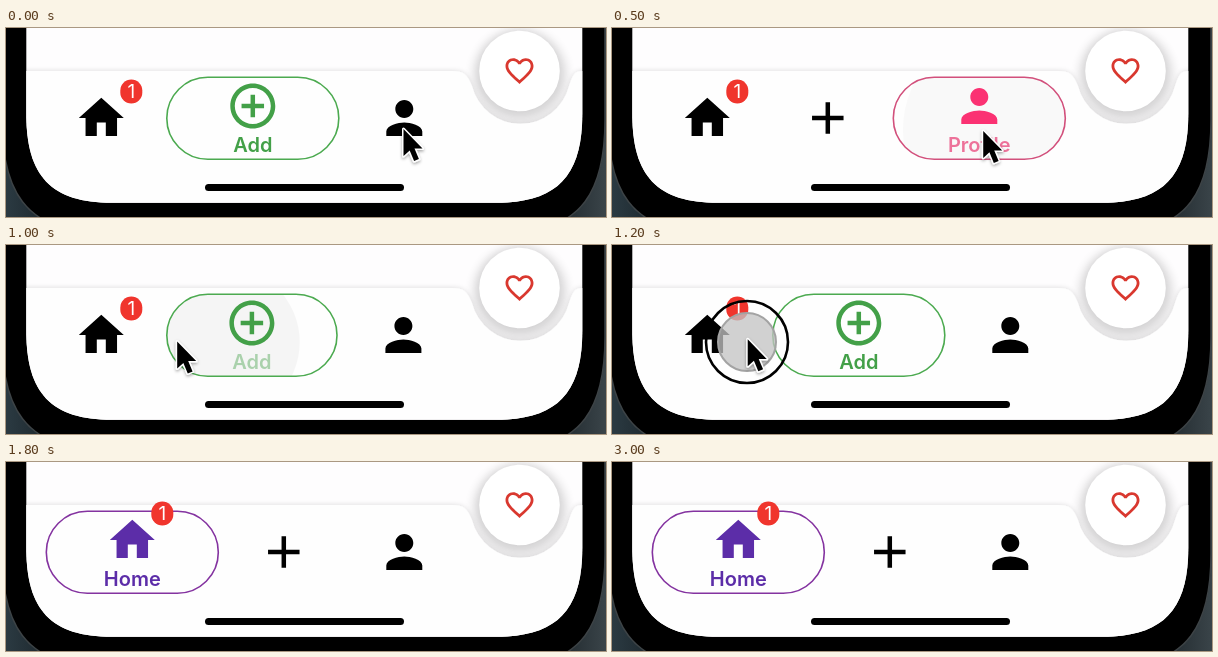
Write an HTML page that moves like this. It is 600 px wide and 189 px high and loops after 3.1 s.

```html
<!DOCTYPE html>
<html lang="en">
<head>
<meta charset="utf-8">
<title>Tab bar</title>
<style>
  html, body { margin: 0; width: 100%; height: 100%; overflow: hidden; background: #000; }
  svg { display: block; width: 600px; height: 189px; }
  text { font-family: Inter, Roboto, sans-serif; text-anchor: middle; }
  .label { font-size: 20px; font-weight: 600; }
  .pill { fill: none; stroke-width: 1.6; }
</style>
</head>
<body>
<svg viewBox="0 0 600 189">
  <defs>
    <linearGradient id="desk" x2="1">
      <stop offset="0" stop-color="#2b3a42"/>
      <stop offset=".06" stop-color="#1f2a30"/>
      <stop offset=".94" stop-color="#262f34"/>
      <stop offset="1" stop-color="#3a4449"/>
    </linearGradient>
    <clipPath id="screen">
      <path d="M20.3 -20V86C20.3 148 45 174.8 106 174.8H490C551 174.8 576.3 148 576.3 86V-20Z"/>
    </clipPath>
    <filter id="soft" x="-40%" y="-40%" width="180%" height="180%"><feGaussianBlur stdDeviation="4"/></filter>
    <filter id="edge" x="-5%" y="-20%" width="110%" height="140%">
      <feDropShadow dx="0" dy="-1" stdDeviation="2" flood-opacity=".1"/>
    </filter>
    <filter id="drop" x="-50%" y="-50%" width="200%" height="200%">
      <feDropShadow dx="0" dy="1.5" stdDeviation="1.5" flood-opacity=".35"/>
    </filter>
  </defs>

  <rect width="600" height="189" fill="url(#desk)"/>
  <path d="M-4 -20V92C-4 162 20 203 88 203H508C576 203 599 162 599 92V-20Z" stroke="#3d4346" stroke-width="1.5"/>

  <g clip-path="url(#screen)">
    <rect width="600" height="189" fill="#fefdfe"/>
    <circle cx="514" cy="48" r="48" opacity=".1" filter="url(#soft)"/>
    <path d="M0 43H446C457 43 461 46 466 58A50 50 0 0 0 563 58C567 46 569 43 577 43H600V200H0Z"
          fill="#fefefe" filter="url(#edge)"/>
    <circle cx="513.5" cy="45" r="40" opacity=".1" filter="url(#soft)"/>
    <circle cx="513.5" cy="43" r="40.3" fill="#fff"/>
    <path transform="translate(496.7 26) scale(1.4)" fill="#d9382f" d="M16.5 3c-1.74 0-3.41.81-4.5 2.09C10.91 3.81 9.24 3 7.5 3 4.42 3 2 5.42 2 8.5c0 3.78 3.4 6.86 8.55 11.54L12 21.35l1.45-1.32C18.6 15.36 22 12.28 22 8.5 22 5.42 19.58 3 16.5 3zm-4.4 15.55l-.1.1-.1-.1C7.14 14.24 4 11.39 4 8.5 4 6.5 5.5 5 7.5 5c1.54 0 3.04.99 3.57 2.36h1.87C13.46 5.99 14.96 5 16.5 5c2 0 3.5 1.5 3.5 3.5 0 2.89-3.14 5.74-7.9 10.05z"/>
    <rect x="199" y="156" width="199" height="7" rx="3.5"/>
    <g id="tabs"></g>
  </g>

  <g id="press">
    <circle r="29" fill="#c3c3c3" fill-opacity=".76" stroke="#a3a3a3" stroke-width="2"/>
    <circle r="41" fill="none" stroke="#000" stroke-width="2.6"/>
  </g>
  <path id="cursor" d="M0 0V27L6.2 21.4L10.6 32L15.4 30L11 19.6H19Z" stroke="#fff" stroke-width="3"
        stroke-linejoin="round" paint-order="stroke" filter="url(#drop)"/>
</svg>

<script>
const LOOP = 3100, LEFT = 40.3, GAP = 10.5, SMALL = 110, WIDE = 172;
const TOP = 49.3, HEIGHT = 82;

const PLUS = 'M19 13h-6v6h-2v-6H5v-2h6V5h2v6h6v2z';
const tabs = [
  { name: 'Home', icon: 'M10 20v-6h4v6h5v-8h3L12 3 2 12h3v8z', fill: '#5c2da8', line: '#8433a0' },
  { name: 'Add', icon: PLUS, fill: '#43a048', line: '#4caa50',
    active: 'M13 7h-2v4H7v2h4v4h2v-4h4v-2h-4V7zm-1-5C6.48 2 2 6.48 2 12s4.48 10 10 10 10-4.48 10-10S17.52 2 12 2zm0 18c-4.41 0-8-3.59-8-8s3.59-8 8-8 8 3.59 8 8-3.59 8-8 8z' },
  { name: 'Profile', icon: 'M12 12c2.21 0 4-1.79 4-4s-1.79-4-4-4-4 1.79-4 4 1.79 4 4 4zm0 2c-2.67 0-8 1.34-8 4v2h16v-2c0-2.66-5.33-4-8-4z',
    fill: '#fb3273', line: '#d2507c', ink: '#e93a72' }
];

// Each tap: chosen tab, press interval, selection time, position, first ripple radius
const taps = [
  { tab: 1, down: -1000, up: -1000, at: -1000, x: 246, y: 97, r: 31 },
  { tab: 2, down: 80, up: 270, at: 298, x: 397, y: 102, r: 31 },
  { tab: 1, down: 750, up: 860, at: 880, x: 218, y: 97, r: 31 },
  { tab: 0, down: 1170, up: 1260, at: 1280, x: 135, y: 97, r: 60 }
];

// Cursor tip: time, x, y
const path = [
  [0, 397.5, 101], [300, 399, 102], [400, 398, 102], [500, 372, 103], [600, 295, 100],
  [700, 222, 96], [800, 218.5, 96], [880, 217, 96], [1000, 171.5, 96.5], [1100, 140, 94.5],
  [1200, 135.7, 94.3], [1420, 135.7, 94.3], [1500, 124, 99], [1600, 82, 115], [1700, 22, 137]
];

const $ = id => document.getElementById(id);
const clamp = v => Math.min(1, Math.max(0, v));
const mix = (a, b, k) => a + (b - a) * k;
const easeInOut = k => k < .5 ? 4 * k ** 3 : 1 - 4 * (1 - k) ** 3;

function add(parent, tag, attrs) {
  const node = document.createElementNS('http://www.w3.org/2000/svg', tag);
  set(node, attrs);
  return parent.appendChild(node);
}
function set(node, attrs) {
  for (const key in attrs) node.setAttribute(key, attrs[key]);
}

tabs.forEach((tab, i) => {
  const root = $('tabs');
  const clip = add(root, 'clipPath', { id: 'clip' + i });
  tab.mask = add(clip, 'rect', { y: TOP, height: HEIGHT, rx: HEIGHT / 2 });
  tab.ripple = add(root, 'circle', { 'clip-path': `url(#clip${i})` });
  tab.pill = add(root, 'rect', { class: 'pill', y: TOP, height: HEIGHT, rx: HEIGHT / 2, stroke: tab.line });
  tab.label = add(root, 'text', { class: 'label', y: 124, fill: tab.ink || tab.fill });
  tab.label.textContent = tab.name;
  tab.glyph = add(root, 'path', {});
});
const badge = add($('tabs'), 'g', {});
add(badge, 'rect', { x: -11, y: -12, width: 22, height: 24, rx: 11, fill: '#f0352d' });
add(badge, 'text', { y: 6.5, fill: '#fff', 'font-size': 19 }).textContent = '1';

function cursorAt(t) {
  const i = path.findIndex(p => p[0] > t);
  if (i < 0) return path[path.length - 1].slice(1);
  const [a, b] = [path[i - 1], path[i]];
  const k = (t - a[0]) / (b[0] - a[0]);
  return [mix(a[1], b[1], k), mix(a[2], b[2], k)];
}

function draw(t) {
  const n = taps.filter(p => p.at <= t).length - 1;
  const tap = taps[n], last = taps[n - 1];
  const age = t - tap.at;
  const grow = easeInOut(clamp(age / 150));
  let x = LEFT;

  tabs.forEach((tab, i) => {
    const on = i === tap.tab;
    const was = last && i === last.tab;
    const width = on ? mix(last ? SMALL : WIDE, WIDE, grow) : was ? mix(WIDE, SMALL, grow) : SMALL;
    const mid = x + width / 2;
    const y = on ? 78 : 90;
    const show = on ? 'visible' : 'hidden';

    set(tab.mask, { x, width });
    set(tab.pill, { x, width, visibility: show });
    set(tab.label, { x: mid, visibility: show, opacity: clamp(age / 290) });
    set(tab.ripple, {
      cx: tap.x, cy: tap.y, r: tap.r + age * .37, visibility: show,
      opacity: age < 120 ? mix(.12, .035, age / 120) : .035 * clamp((300 - age) / 180)
    });
    set(tab.glyph, {
      d: on && tab.active || tab.icon,
      fill: on ? tab.fill : '#000',
      transform: `translate(${mid - 27} ${y - 27}) scale(2.25)`
    });
    if (i === 0) set(badge, { transform: `translate(${mid + 30} ${y - 26.5})` });
    x += width + GAP;
  });

  const held = taps.find(p => t >= p.down && t < p.up);
  set($('press'), {
    visibility: held ? 'visible' : 'hidden',
    transform: held ? `translate(${held.x} ${held.y})` : ''
  });
  set($('cursor'), {
    visibility: t < 1740 ? 'visible' : 'hidden',
    transform: `translate(${cursorAt(t)})`
  });
}

const start = performance.now();
function tick() {
  draw((performance.now() - start) % LOOP);
  requestAnimationFrame(tick);
}
tick();
</script>
</body>
</html>
```
